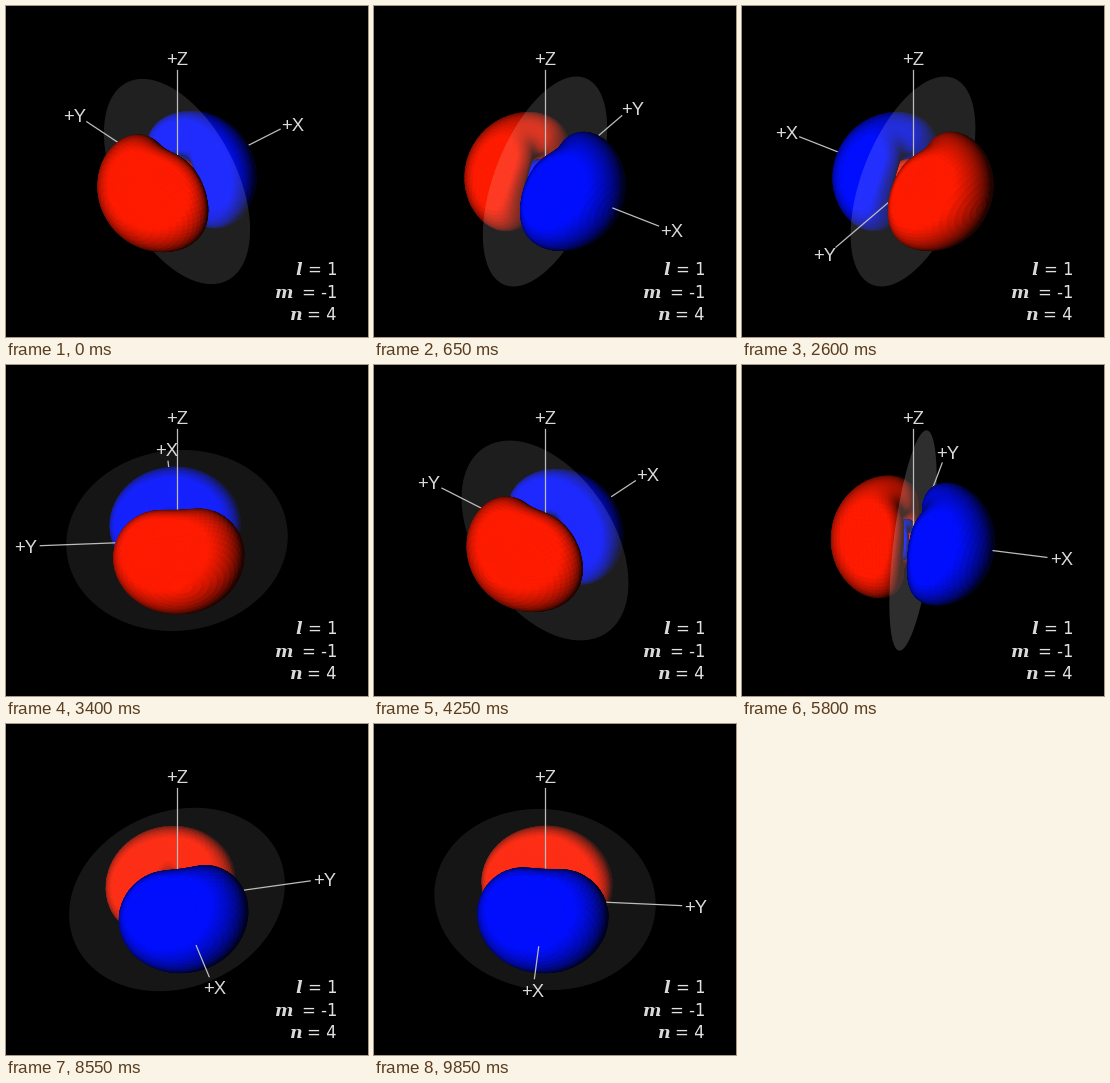
Recreate the animation shown at these times as a matplotlib script. Size 362 by 331 pixels, loop 9900 ms.

```python
import numpy as np
import matplotlib.pyplot as plt
from matplotlib.animation import FuncAnimation
from matplotlib.collections import PolyCollection

W, H = 362, 331
FRAMES, STEP = 198, 50
CX, CY = 171, 175.5
AXIS_LEN, DISC_R, LOBE_R = 137, 111, 82
PITCH = np.radians(35.4)
SIN_P, COS_P = np.sin(PITCH), np.cos(PITCH)
BLUE, RED = np.array([0, 0.055, 1]), np.array([1, 0.105, 0])
LIGHT = np.array([-0.28, -0.05, 0.96])
LEVEL = 1.3


def radial(r):
    """4p radial function weighted by r."""
    return r**2 * (r**2 - 10 * r + 20) * np.exp(-r / 2)


def shell_mesh(r_in, r_out, rows, cols):
    """Closed surface |radial| * sin(theta)^2 * cos(phi) = LEVEL around +x."""
    t = np.linspace(0, np.pi, rows + 1)
    r = (r_in + (r_out - r_in) * (1 - np.cos(t)) / 2)[:, None]
    psi = np.linspace(0, 2 * np.pi, cols + 1)[None, :]
    k2 = np.minimum(1, LEVEL / np.abs(radial(r))) ** 2
    s = np.sin(psi) ** 2
    # u = squared cosine from the lobe axis, root of s u^2 + (1 - s) u = k2
    u = 2 * k2 / (1 - s + np.sqrt((1 - s) ** 2 + 4 * s * k2))
    u[[0, -1]] = 1
    side = np.sqrt(1 - np.clip(u, 0, 1))
    p = np.stack([r * np.sqrt(u), r * side * np.cos(psi), r * side * np.sin(psi)], -1)
    quads = np.stack([p[:-1, :-1], p[1:, :-1], p[1:, 1:], p[:-1, 1:]], 2).reshape(-1, 4, 3)
    n = np.cross(quads[:, 2] - quads[:, 0], quads[:, 3] - quads[:, 1])
    n /= np.linalg.norm(n, axis=1, keepdims=True) + 1e-12
    if n[-cols:, 0].mean() < 0:
        n = -n
    return quads, n


def build_lobe():
    """All nested shells on the +x side, with a sign per face."""
    r = np.linspace(0.001, 28, 28000)
    edges = np.flatnonzero(np.diff((np.abs(radial(r)) > LEVEL).astype(int)))
    quads, normals, signs = [], [], []
    sizes = [(10, 20), (18, 32), (44, 72)]
    for (i, j), (rows, cols) in zip(edges.reshape(-1, 2), sizes):
        q, n = shell_mesh(r[i + 1], r[j], rows, cols)
        quads.append(q)
        normals.append(n)
        signs.append(np.full(len(q), np.sign(radial((r[i] + r[j]) / 2))))
    scale = LOBE_R / r[edges[-1]]
    return np.concatenate(quads) * scale, np.concatenate(normals), np.concatenate(signs)


QUADS, NORMALS, SIGNS = build_lobe()


def spin(ms):
    """Azimuth of +x: a flick that dies away exponentially."""
    t = np.hypot(ms, 55) / 1000
    return np.radians(-411.3 + 550 * np.exp(-0.25 * t))


def view(p, a):
    """Rotate points to (right, down, towards the viewer)."""
    x, y, z = np.moveaxis(np.asarray(p, float), -1, 0)
    right = x * np.sin(a) + y * np.cos(a)
    fwd = x * np.cos(a) - y * np.sin(a)
    return np.stack([right, fwd * SIN_P - z * COS_P, fwd * COS_P + z * SIN_P], -1)


def to_screen(v):
    return v[..., :2] + (CX, CY)


fig = plt.figure(figsize=(W / 100, H / 100), dpi=100, facecolor="black")
ax = fig.add_axes([0, 0, 1, 1])
ax.set_xlim(0, W)
ax.set_ylim(H, 0)
ax.axis("off")

far = PolyCollection([], linewidths=0.6, zorder=1)
disc = PolyCollection([], facecolors="white", linewidths=0, zorder=2)
near = PolyCollection([], linewidths=0.6, zorder=4)
for c in (far, disc, near):
    ax.add_collection(c, autolim=False)

lines, labels = [], []
for name in "XYZ":
    lines.append(ax.plot([], [], color="0.74", lw=0.9, zorder=3)[0])
    labels.append(ax.text(0, 0, "+" + name, color="0.85", family="Liberation Sans",
                          fontsize=18.5 * 0.72, ha="center", va="center_baseline", zorder=6))

for letter, value, x, y in (("l", "= 1", 296, 269), ("m", "= -1", 287, 292), ("n", "= 4", 296, 314)):
    ax.text(x, y, letter, color="0.85", family="DejaVu Serif", style="italic", weight="bold",
            fontsize=17.5 * 0.72, ha="right", va="baseline", zorder=6)
    ax.text(331, y, value, color="0.88", family="DejaVu Sans",
            fontsize=16.5 * 0.72, ha="right", va="baseline", zorder=6)

ring = np.linspace(0, 2 * np.pi, 120)
DISC = DISC_R * np.stack([0 * ring, np.cos(ring), np.sin(ring)], -1)


def draw_lobe(coll, side, a):
    mirror = (side, 1, 1)
    n = view(NORMALS * mirror, a)
    front = n[:, 2] > 0
    v = view(QUADS[front] * mirror, a)
    order = np.argsort(v[..., 2].mean(1))
    light = np.clip(0.13 + 1.15 * (n[front][order] @ LIGHT), 0.13, 1)[:, None]
    blue = (SIGNS[front][order] * side > 0)[:, None]
    colors = np.where(blue, BLUE, RED) * light
    coll.set_verts(to_screen(v[order]))
    coll.set_facecolor(colors)
    coll.set_edgecolor(colors)


def update(i):
    a = spin(i * STEP)
    facing = 1 if np.cos(a) > 0 else -1
    draw_lobe(far, -facing, a)
    draw_lobe(near, facing, a)
    disc.set_verts([to_screen(view(DISC, a))])
    disc.set_alpha(0.21 - 0.15 * abs(np.cos(a)) * COS_P)

    starts = (LOBE_R, 0, 0)
    for d, start, line, label in zip(np.eye(3), starts, lines, labels):
        ends = to_screen(view([d * start, d * AXIS_LEN], a))
        line.set_data(ends[:, 0], ends[:, 1])
        out = ends[1] - (CX, CY)
        out /= np.hypot(*out)
        label.set_position(ends[1] + out * (14.5, 11.5))
    lines[0].set_zorder(5 if facing > 0 else 0)
    return [far, disc, near, *lines, *labels]


anim = FuncAnimation(fig, update, frames=FRAMES, interval=STEP, repeat=True, repeat_delay=0)
plt.show()
```
